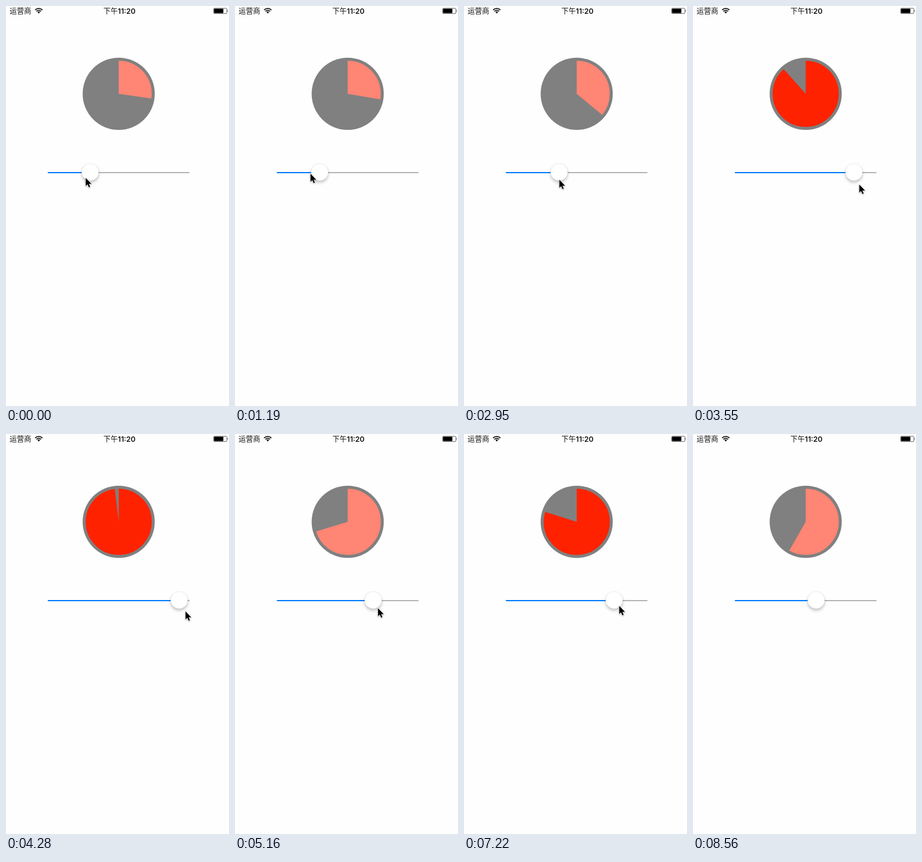
These frames come from a looping animation (371 by 665 pixels, 8850 ms). An HTML page:

```html
<!DOCTYPE html>
<html lang="zh">
<head>
<meta charset="utf-8">
<title>Pie progress slider</title>
<style>
  html, body { margin: 0; width: 100%; height: 100%; overflow: hidden; background: #fefefe; }
  svg { display: block; width: 100%; height: 100%; }
  text { font: 12px Inter, "Noto Sans CJK SC", "Noto Sans CJK", sans-serif; fill: #111; }
  .time { font-weight: 600; text-anchor: middle; }
  .cjk { font-weight: 500; }
  #thumb { filter: drop-shadow(0 3px 2.5px rgba(0, 0, 0, .24)); }
  #cursor { filter: drop-shadow(0 1px 1px rgba(0, 0, 0, .3)); }
</style>
</head>
<body>
<svg viewBox="0 0 371 665">
  <text x="6" y="12.6">运营商</text>
  <g fill="none" stroke="#111" stroke-width="1.7">
    <path d="M48.4 6.6a8.6 8.6 0 0 1 12.2 0M50.6 8.9a5.5 5.5 0 0 1 7.8 0"/>
    <path d="M54.5 12.6l-2.1-2.2a3 3 0 0 1 4.2 0z" fill="#111" stroke="none"/>
  </g>
  <text class="time" x="188.8" y="12.6"><tspan class="cjk">下午</tspan>11:20</text>
  <rect x="345.5" y="3.8" width="22" height="8.8" rx="1.5" fill="none" stroke="#444" stroke-width=".8"/>
  <rect x="346.2" y="4.6" width="15.4" height="7.2" rx=".7"/>
  <path d="M368.6 6.6q1.6 1.6 0 3.2z"/>

  <circle cx="187.5" cy="146" r="60" fill="#808080"/>
  <circle id="pie" cx="187.5" cy="146" r="27.5" fill="none" stroke-width="55"
          pathLength="1" transform="rotate(-90 187.5 146)"/>

  <rect x="69.5" y="276" width="236" height="2" rx="1" fill="#b5b5b5"/>
  <rect id="fill" x="69.5" y="276" height="2" rx="1" fill="#007aff"/>
  <circle id="thumb" cy="276.3" r="14.2" fill="#fff" stroke="#000" stroke-opacity=".12" stroke-width=".5"/>

  <path id="cursor" d="M.6 .8V14.2L3.6 11.5L5.9 16.5L8 15.5L5.8 10.7H10.2Z"
        stroke="#fff" stroke-width="1.2" paint-order="stroke"/>
</svg>
<script>
const LOOP = 8850, STEPS = 60, STEP = LOOP / STEPS;
const THRESHOLD = 0.75;
const RESTS = [38, 53]; // steps on which the hand pauses

// Turning points of the drag: moves made so far, slider value, cursor x and y.
const turns = [
  [0, .273, 132, 285],
  [8, .277, 125, 278],
  [15, 0, 61, 283],
  [20, .36, 158, 288],
  [24, .884, 276, 296],
  [29, .981, 298, 294],
  [37, .61, 217, 287],
  [45, .906, 285, 285],
  [51, .583, 203, 285],
  [56, .583, 322, 675]
];

const [pie, fill, thumb, cursor] =
  ['pie', 'fill', 'thumb', 'cursor'].map(id => document.getElementById(id));

function poseAt(moves) {
  const next = turns.findIndex(turn => turn[0] > moves);
  if (next < 0) return turns.at(-1);
  const a = turns[next - 1], b = turns[next];
  const k = (moves - a[0]) / (b[0] - a[0]);
  return a.map((v, i) => v + (b[i] - v) * k);
}

function draw(now) {
  // The picture advances in even steps; the small lead absorbs rounding.
  const step = Math.floor((now % LOOP + 4) / STEP) % STEPS;
  const moves = step - RESTS.filter(rest => rest <= step).length;
  const [, value, x, y] = poseAt(moves);
  const thumbX = 83 + 209 * value;
  pie.setAttribute('stroke-dasharray', `${value} 2`);
  pie.setAttribute('stroke', value > THRESHOLD ? '#ff2200' : '#ff8574');
  fill.setAttribute('width', thumbX - 69.5);
  thumb.setAttribute('cx', thumbX);
  cursor.setAttribute('transform', `translate(${x} ${y})`);
}

const start = performance.now();
function tick() {
  draw(performance.now() - start);
  requestAnimationFrame(tick);
}
tick();
</script>
</body>
</html>
```
